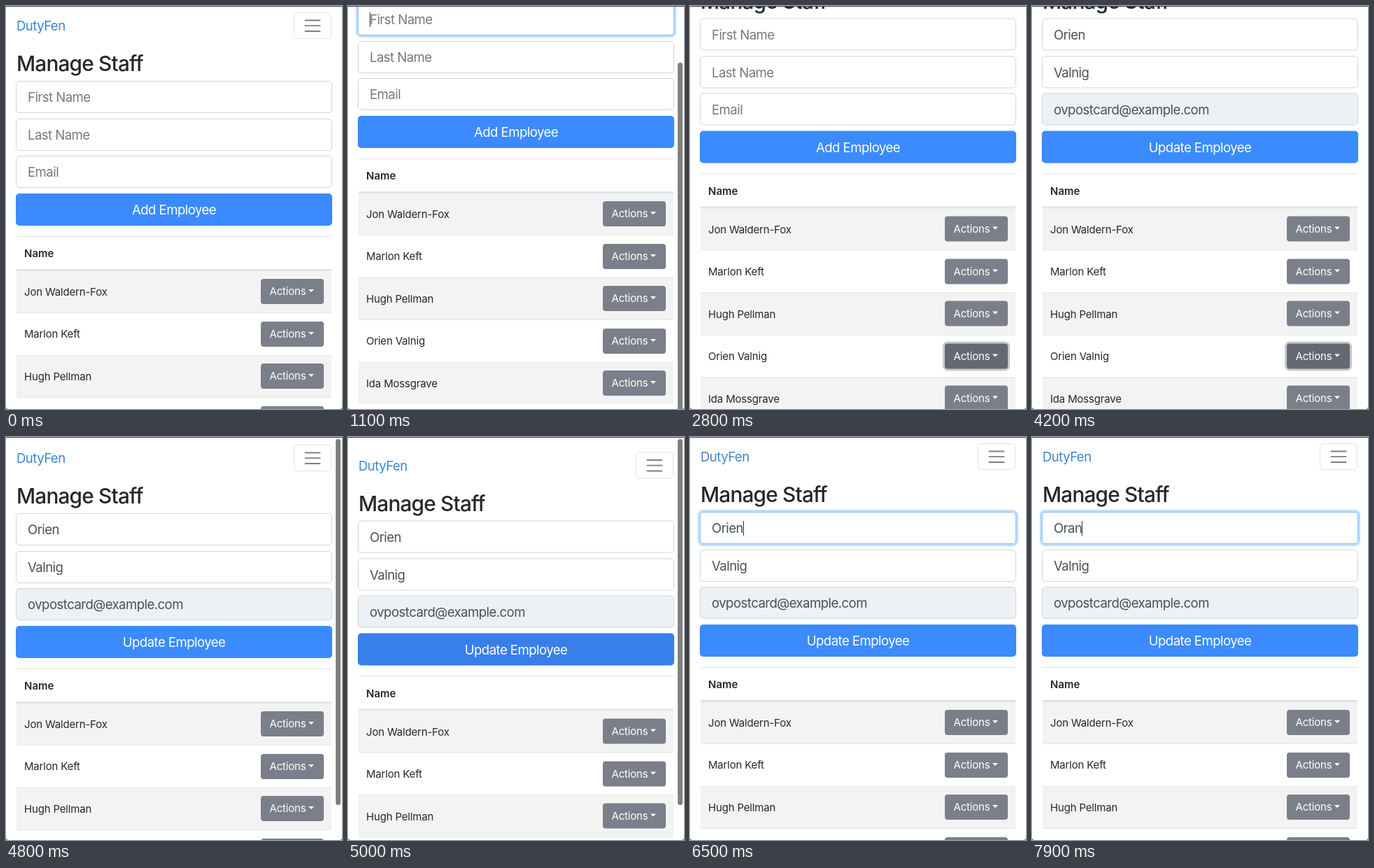
Write an HTML page that moves like this. It is 480 px wide and 576 px high and loops after 8000 ms.

```html
<!DOCTYPE html>
<html lang="en">
<head>
<meta charset="utf-8">
<title>Manage Staff</title>
<style>
* { box-sizing: border-box; }
html, body { margin: 0; width: 100%; height: 100%; overflow: hidden; background: #777; }
#stage {
  position: relative; width: 480px; height: 576px; overflow: hidden;
  background: #fff; border-radius: 0 0 4px 4px;
  font: 15px/1.5 Inter, Roboto, sans-serif; letter-spacing: -.012em; color: #24272b;
}
#stage::after { content: ""; position: absolute; inset: 0 0 auto; height: 1px; background: #3c3c3e; }
#page { position: absolute; inset: 0; }
#page > * { position: absolute; left: 15px; width: 450px; margin: 0; }
#page > .field, #page > .submit { left: 14px; width: 452px; }
.brand, .field, .submit { font-size: 18.6px; letter-spacing: -.03em; }
#page .brand { top: 15px; width: auto; color: #3a86d1; }
#page .toggler {
  top: 9px; left: 411px; width: 54px; height: 38px;
  border: 1px solid #dfe4e8; border-radius: 5px;
}
.toggler svg { display: block; margin: 7px 14px; }
h1 { top: 64px; font-size: 29.8px; line-height: 37px; font-weight: 500; letter-spacing: -.028em; }
.field {
  height: 46px; padding-left: 16px; line-height: 45px; white-space: pre;
  border: 1px solid #d0d5da; border-radius: 5px; color: #495057; background: #fff;
}
.field.empty { color: #75797e; }
.field.locked { background: #edf0f5; }
.caret {
  display: inline-block; width: 1px; height: 21px; margin-right: -1px;
  vertical-align: -4px; background: #333;
}
.ring {
  position: absolute; inset: -1px; border: 1px solid #80bdff; border-radius: 5px;
  box-shadow: 0 0 0 3px #bfdeff; opacity: 0;
}
.submit {
  top: 268px; height: 46px; line-height: 46px; text-align: center;
  color: #fff; background: #3b8bfe; border-radius: 5px;
}
.submit.hover { background: #397fe9; }
.head { top: 329px; height: 49px; padding: 13px 11px; font-weight: 600;
  border-top: 1px solid #dee2e6; border-bottom: 2px solid #dee2e6; letter-spacing: 0; }
.row { height: 60.5px; padding-left: 11px; line-height: 60px; border-top: 1px solid #e2e5e8; }
.row.odd { background: #f3f3f4; }
.action {
  position: absolute; right: 11px; top: 11.5px; width: 90px; height: 36px;
  line-height: 36px; padding-left: 12.5px; border-radius: 4px; color: #fff; background: #7b7f89;
}
.action::after {
  content: ""; display: inline-block; margin-left: 4px; vertical-align: 4px;
  border: 4.6px solid transparent; border-top-color: #fff; border-bottom: 0;
}
.action.on { background: #656972; box-shadow: 0 0 0 3px #c6c8cd; }
#thumb {
  position: absolute; left: 471px; width: 7px; height: 523px;
  border-radius: 4px; background: #7f7f7f;
}
</style>
</head>
<body>
<div id="stage">
  <div id="page">
    <div class="brand">DutyFen</div>
    <div class="toggler">
      <svg width="24" height="23" stroke="#7d7f80" stroke-width="1.8" stroke-linecap="round">
        <path d="M1.5 3.5h21M1.5 11.2h21M1.5 19h21"/>
      </svg>
    </div>
    <h1>Manage Staff</h1>
    <div class="submit"></div>
    <div class="head">Name</div>
  </div>
  <div id="thumb"></div>
</div>
<script>
const LOOP = 8000, STEP = 100, BOTTOM = 89.5;
const staff = ["Jon Waldern-Fox", "Marlon Keft", "Hugh Pellman", "Orien Valnig", "Ida Mossgrave"];
const hints = ["First Name", "Last Name", "Email"];
const values = ["Orien", "Valnig", "ovpostcard@example.com"];

const page = document.getElementById("page");
const thumb = document.getElementById("thumb");
const submit = page.querySelector(".submit");

function add(parent, cls, text = "", top) {
  const el = document.createElement("div");
  el.className = cls;
  el.textContent = text;
  if (top !== undefined) el.style.top = top + "px";
  parent.append(el);
  return el;
}

const fields = hints.map((_, i) => {
  const el = add(page, "field", "", 106.7 + i * 53.8);
  const before = document.createElement("span");
  const after = document.createElement("span");
  el.append(before, after);
  return { el, before, after };
});
const ring = add(fields[0].el, "ring");
const caret = document.createElement("span");
caret.className = "caret";
fields[0].before.after(caret);

const actions = staff.map((name, i) =>
  add(add(page, "row" + (i % 2 ? "" : " odd"), name, 377.5 + i * 60.5), "action", "Actions"));

const within = (t, a, b) => t >= a && t < b;
const ramp = (t, a, b) => Math.min(1, Math.max(0, (t - a) / (b - a)));
const ease = x => x * x * (3 - 2 * x);

// Fast flicks that overshoot the page ends and spring back
function scrollAt(t) {
  if (t < 1100) return 111 * ease(ramp(t, 900, 1100));
  if (t < 4500) return BOTTOM + 21.5 * Math.exp((1100 - t) / 200);
  if (t < 4900) return BOTTOM - 108.2 * ease(ramp(t, 4500, 4900));
  return -18.7 * Math.exp((4900 - t) / 250) * (1 - ramp(t, 5000, 5400));
}

function barAt(t) {
  if (t < 3000) return t < 1000 ? 0 : 1 - ramp(t, 1500, 1900);
  return t < 4600 ? 0 : 1 - ramp(t, 5100, 5530);
}

function firstName(t) {
  if (t < 7000) return values[0];
  if (t < 7300) return values[0].slice(0, 4 - (t - 7000) / STEP);
  return values[0].slice(0, 2) + (t < 7400 ? "" : t < 7700 ? "a" : "an");
}

function caretOn(t) {
  if (within(t, 700, 2600)) return (t - 700) % 1000 < 500;
  return t >= 6300 && (t >= 7000 || (t - 6300) % 1000 < 500);
}

function draw(t) {
  const y = scrollAt(t), editing = t >= 3600;
  page.style.transform = `translateY(${-Math.round(y * 2) / 2}px)`;
  thumb.style.top = 3 + 78 * ramp(y, 0, BOTTOM) + "px";
  thumb.style.opacity = barAt(t);

  fields.forEach(({ el, before, after }, i) => {
    el.classList.toggle("empty", !editing);
    el.classList.toggle("locked", editing && i === 2);
    before.textContent = !editing ? "" : i ? values[i] : firstName(t);
    after.textContent = editing ? "" : hints[i];
  });
  ring.style.opacity = t < 4000
    ? ramp(t, 650, 800) - ramp(t, 2550, 2700)
    : ramp(t, 6250, 6400);
  caret.style.visibility = caretOn(t) ? "visible" : "hidden";

  submit.textContent = editing ? "Update Employee" : "Add Employee";
  submit.classList.toggle("hover", within(t, 4900, 5200));
  actions[3].classList.toggle("on", within(t, 2600, 4500));
}

function tick() {
  const t = performance.now() % LOOP;
  draw(Math.floor(t / STEP) * STEP);
  requestAnimationFrame(tick);
}
tick();
</script>
</body>
</html>
```
